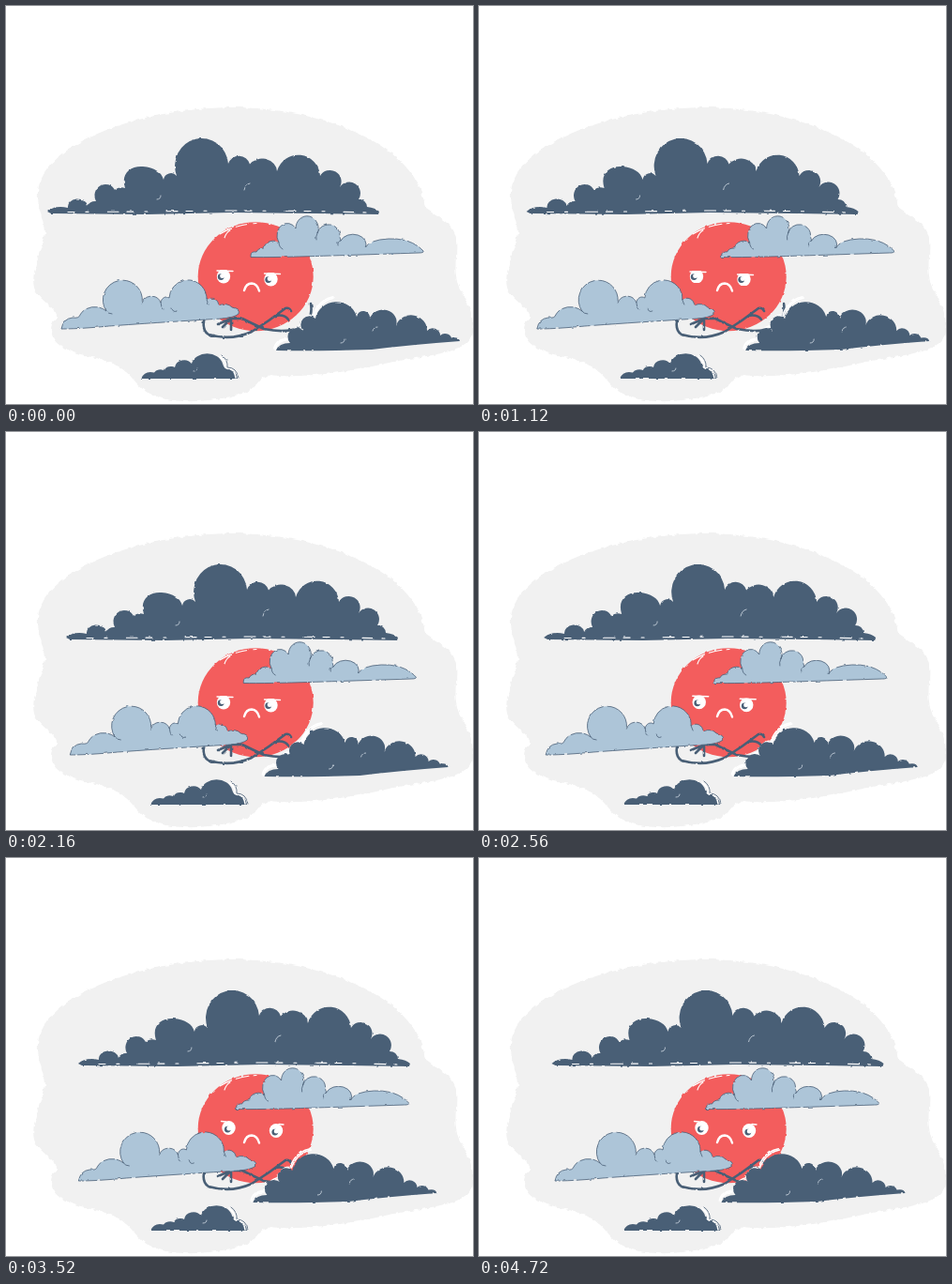
Write an HTML page that moves like this. It is 498 px wide and 424 px high and loops after 4800 ms.

```html
<!DOCTYPE html>
<html lang="en">
<head>
<meta charset="utf-8">
<title>Grumpy sun</title>
<style>
html, body { margin: 0; width: 100%; height: 100%; overflow: hidden; background: #fff; }
svg { display: block; }
.line { fill: none; stroke-linecap: round; stroke-linejoin: round; }
.dark { fill: #495f76; }
.light { fill: #adc5d8; stroke: #495f76; stroke-width: .8; stroke-dasharray: 34 3 12 2 50 4; }
.arm { stroke: #495f76; stroke-width: 2.6; }
.white { stroke: #fff; stroke-width: 1.1; }
.fold { stroke: #495f76; stroke-width: .8; }
.halo { stroke: #fff; stroke-width: 1.6; stroke-dasharray: 22 2 9 1; }
.glint { stroke: #b9c5d1; stroke-width: 1; }
</style>
</head>
<body>
<svg width="498" height="424" viewBox="0 0 498 424">
  <defs>
    <filter id="paper" color-interpolation-filters="sRGB">
      <feTurbulence type="fractalNoise" baseFrequency=".2" seed="4"/>
      <feDisplacementMap in="SourceGraphic" scale="5" xChannelSelector="R" yChannelSelector="G"/>
      <feGaussianBlur stdDeviation=".4"/>
    </filter>
    <filter id="chalk" color-interpolation-filters="sRGB">
      <feTurbulence id="grain" type="fractalNoise" baseFrequency=".2" seed="1"/>
      <feDisplacementMap in="SourceGraphic" scale="2.6" xChannelSelector="R" yChannelSelector="G"/>
      <feGaussianBlur stdDeviation=".4"/>
    </filter>
    <clipPath id="open"><rect id="lid" x="-12" y="-7" width="24" height="20"/></clipPath>
  </defs>

  <path filter="url(#paper)" fill="#f1f1f1" d="M34 205C30 152 130 111 235 108C340 107 441 150 447 215C460 226 478 230 480 248C482 270 475 285 485 303C493 317 500 330 497 347C496 372 440 372 400 382C360 391 310 397 282 393C268 396 272 405 255 412C220 423 170 426 148 410C136 400 133 392 120 384C100 372 63 373 51 355C46 345 48 338 53 333C58 325 42 318 32 305C24 290 35 270 41 242C41 228 35 220 34 205Z"/>

  <g filter="url(#chalk)">
    <ellipse cx="266.2" cy="288.2" rx="61.5" ry="58" fill="#f35d5d"/>
    <path class="line white" d="M228 243Q244 233 267 231.5M233 247Q235 241 239 239M313 246Q320 254 323 264" stroke-dasharray="14 5"/>
  </g>
  <g class="eye"></g>
  <g class="eye"></g>
  <path class="line" stroke="#fff" stroke-width="2.4" d="M254 303Q256 295.5 262 295.5Q268 296 270 303.5"/>
  <g filter="url(#chalk)" class="line arm">
    <path d="M212 331Q208 345 216 350Q240 357 262 347Q280 336 298 322Q302 321 304 325M287 330Q297 328 301 334"/>
    <path d="M325 317Q328 335 314 342Q300 349 275 344Q262 338 252 333L240 333L226 339M240 335L240 345M238 335L231 342"/>
  </g>

  <g class="cloud"><g filter="url(#chalk)">
    <path class="dark" d="M44 219Q52 212 66 215A10 8 0 0 1 87 213A9 8 0 0 1 96 208A11 11.5 0 0 1 116 196A9 6 0 0 1 127 194C122 178 133 170 146 171C158 172 166 177 168 185A8 8 0 0 1 182 181A28.5 29.5 0 1 1 237 168A12 12 0 0 1 260 168.5A16 14 0 0 1 289 176A23.5 24 0 0 1 335 181A12 12 0 0 1 356 193A11.5 11.5 0 0 1 376 206Q384 206 385 214Q394 215 398 219L397 222L330 221L240 220L150 222L48 221Z"/>
    <path class="line white" stroke-dasharray="7 12 3 20 12 9" stroke-width=".6" d="M66 219.5L150 219L240 218L330 218.5L384 220"/>
    <path class="line glint" d="M254 196Q255 190 260 189M161 206Q165 206 165 202"/>
  </g></g>

  <g class="cloud"><g filter="url(#chalk)">
    <path class="light" d="M261 266Q261 261 267 262A8 6 0 0 1 275 258A10 9 0 0 1 291 252A11 13 0 0 1 309 237A12 13 0 1 1 332 242A12.2 12 0 0 1 356 246L357 250A13 10 0 0 1 383 258Q387 249 408 248Q432 247 445 261Q446 263 440 263Q380 265 330 266.5T261 267.5Z"/>
    <path class="line fold" d="M291 252Q291 257 295 259M332 242Q330 246 331 249M357 250Q353 251 354 255"/>
  </g></g>

  <g class="cloud"><g filter="url(#chalk)">
    <path class="light" d="M59 344Q61 333 71 332Q78 333 79 329A17 14 0 0 1 107 325A21 21 0 1 1 145 317A10.5 10.5 0 0 1 165 316A6 7 0 0 1 174 311A20 20 0 0 1 214 313A8 8 0 0 1 227 319A10 8 0 0 1 241 321Q250 323 248 328Q243 332 230 333Q150 338 110 341Q80 344 59 344Z"/>
    <path class="line fold" d="M107 325Q109 328 113 328M165 316Q165 321 168 323M177 322Q178 327 182 325M214 313L216 318"/>
  </g></g>

  <g class="cloud"><g filter="url(#chalk)">
    <path id="edge" class="line halo" d="M287 366Q289 356 302 355.5Q306 344 315 342Q319 331 329 330Q335 314 350 311"/>
    <use href="#edge" x="-1.2" y="-1.2" style="stroke:#495f76"/>
    <path class="dark" d="M288 367Q291 359 303 359A9 9 0 0 1 317 346A9 9 0 0 1 330 333A22.5 21 0 0 1 374 331A7 7 0 0 1 388 333A14 12.5 0 0 1 416 340A17 16 0 0 1 449 346A8 8 0 0 1 463 351A7 6 0 0 1 475 353.5Q483 352 484 357Q430 361 390 366Q330 368 288 367Z"/>
    <path class="line glint" d="M391 346Q392 342 396 342M357 359Q361 359 361 355"/>
  </g></g>

  <g class="cloud"><g filter="url(#chalk)">
    <path class="dark" d="M144 397Q148 388 158 390.5A8 6 0 0 1 169 388A7 5 0 0 1 180 385A10 9 0 0 1 198 381A17 14 0 0 1 231 381Q233 388 238 387Q246 389 247 397Z"/>
    <path class="line halo" stroke-width="1.2" d="M228 374Q235 378 234 385Q244 386 245 396"/>
    <path class="line fold" d="M230 372Q237 377 236 385Q246 385 248 396"/>
    <path class="line glint" d="M200 389Q204 389 204 386"/>
  </g></g>
</svg>
<script>
const LOOP = 4800, STEP = 80;
// Distance in px and duration in ms, in drawing order of the clouds.
const drifts = [[33.5, 3840], [-18.5, 4800], [22, 4800], [-29.5, 4800], [10, 2000]];
const clouds = document.querySelectorAll('.cloud');
const eyes = document.querySelectorAll('.eye');
const grain = document.getElementById('grain');
const lid = document.getElementById('lid');

const ease = (t, start, length) => {
  const p = Math.min(1, Math.max(0, (t - start) / length));
  return (1 - Math.cos(Math.PI * p)) / 2;
};

eyes.forEach(eye => eye.innerHTML = `
  <g clip-path="url(#open)">
    <ellipse rx="7.2" ry="7.6" fill="#fff"/>
    <g class="pupil"><circle r="3.4" fill="#495f76"/><circle cx="1.5" cy="-1" r="2.5" fill="#fff"/></g>
  </g>
  <path class="line brow" stroke="#fff" stroke-width="1.3"/>`);

function draw(now) {
  const t = Math.floor(now % LOOP / STEP) * STEP;
  grain.setAttribute('seed', 1 + t / STEP % 3);
  clouds.forEach((cloud, i) => {
    const [distance, length] = drifts[i];
    cloud.setAttribute('transform', `translate(${distance * ease(t, 0, length)})`);
  });

  const look = ease(t, 2400, 320);
  const squint = ease(t, 400, 240) * (1 - ease(t, 960, 320));
  const top = -7 + 2 * squint - look;
  lid.setAttribute('y', top);
  lid.setAttribute('height', 15 - 4 * squint + look);
  eyes.forEach((eye, i) => {
    const x = (i ? 282.5 : 232) + 5.5 * look, y = (i ? 291 : 288) - .5 * look;
    eye.setAttribute('transform', `translate(${x} ${y})`);
    eye.querySelector('.pupil').setAttribute('transform', `translate(${-2.8 + 1.6 * look} ${.6 + look})`);
    const from = look < .5 ? -7 : i ? 3 : -8, to = look < .5 ? 10 : i ? 8 : -3;
    eye.querySelector('.brow').setAttribute('d', `M${from} ${top + 1}L${to} ${top + 1.5}`);
  });
  requestAnimationFrame(draw);
}
requestAnimationFrame(draw);
</script>
</body>
</html>
```
